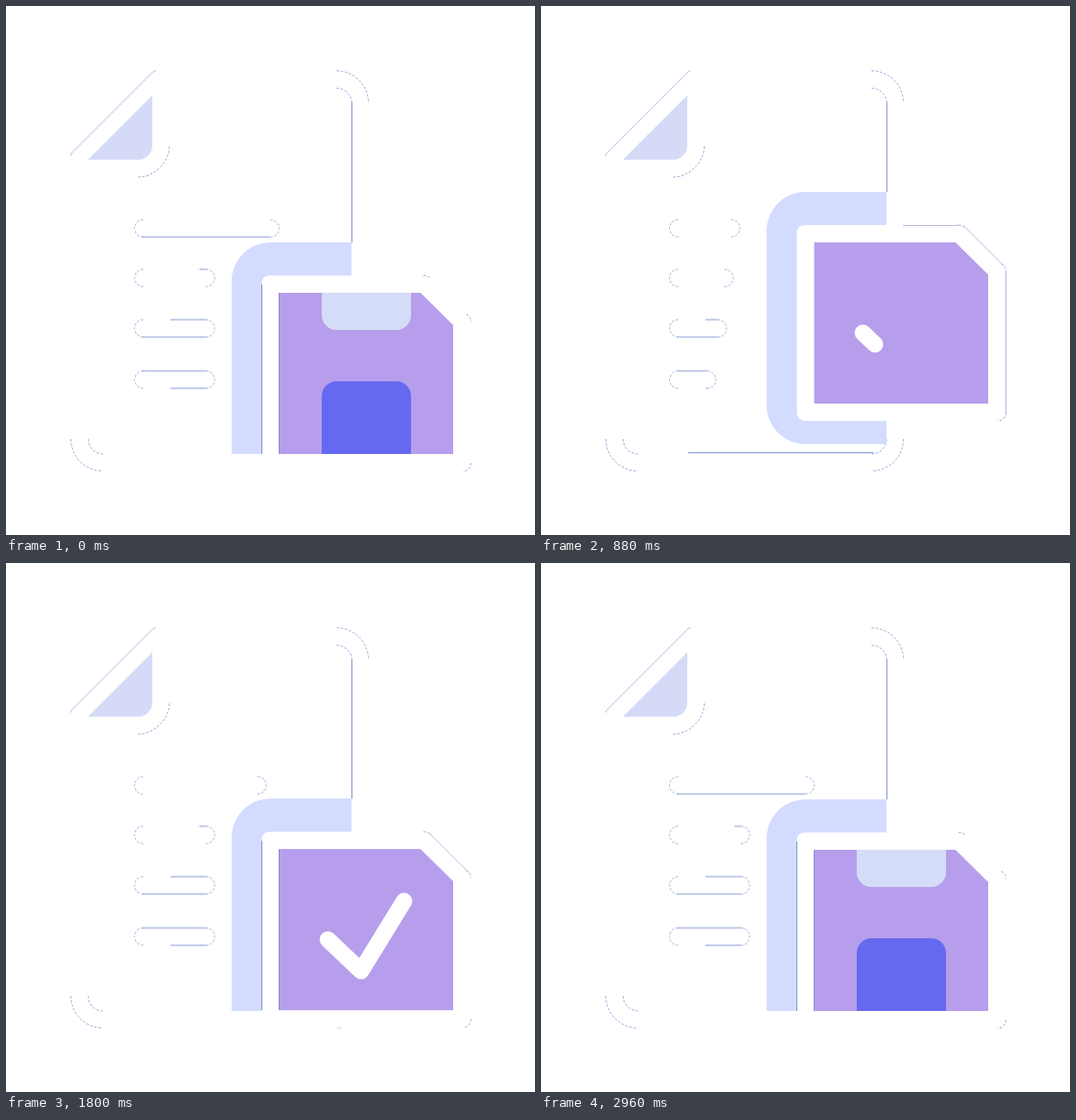
Animation of 640 by 640 pixels, one loop 3 s. Source, as an HTML page:

```html
<!DOCTYPE html>
<html lang="en">
<head>
<meta charset="utf-8">
<title>Saving a document</title>
<style>
  html, body { margin: 0; width: 100%; height: 100%; overflow: hidden; background: #fff; }
  svg { display: block; width: 100%; height: 100%; }

  .line { fill: none; stroke: #7189c8; stroke-width: 1; }
  .dots { fill: none; stroke: #8f9dd6; stroke-width: 1; stroke-dasharray: 3 2; }
  .soft { stroke: #a9b4dc; }
  .rim { stroke: #8f7bd0; }
  .paper { fill: #fff; }
  .fold { fill: #d5dbf7; }

  .disk, .page, .shutter, .tick, .shrink, .grow, .widen {
    animation: 3s cubic-bezier(.33, 0, .67, 1) infinite;
  }
  .disk { animation-name: lift; }
  .page { animation-name: slide; }
  .shutter { animation-name: shutter; }
  .tick { animation-name: tick; }
  .shrink { animation-name: shrink; }
  .grow { animation-name: grow; }
  .widen { animation-name: widen; }

  .high, .low, .moving, .base, .bevel, .early, .late, .covered {
    animation: 3s step-end infinite;
  }
  .high { animation-name: high; }
  .low { animation-name: low; }
  .moving { animation-name: moving; }
  .base { animation-name: base; }
  .bevel { animation-name: bevel; }
  .early { animation-name: early; }
  .late { animation-name: late; }
  .covered { animation-name: covered; }

  @keyframes lift {
    0%, 16.83% { transform: translateY(0); }
    29.33%, 44% { transform: translateY(-61px); }
    61.33%, 100% { transform: translateY(0); }
  }
  @keyframes slide {
    0%, 13.33% { transform: translateY(474px); }
    29.33%, 100% { transform: translateY(0); }
  }
  @keyframes shutter {
    0% { transform: translateX(0); }
    16% { transform: translateX(0); animation-timing-function: cubic-bezier(.33, 0, .67, .33); }
    28% { transform: translateX(200px); animation-timing-function: step-end; }
    28.1%, 80% { transform: translateX(-211px); }
    96%, 100% { transform: translateX(0); }
  }
  @keyframes tick {
    0% { stroke-dashoffset: 100; opacity: 0; animation-timing-function: step-end; }
    26.67% { stroke-dashoffset: 100; opacity: 1; }
    38.67%, 64% { stroke-dashoffset: 0; opacity: 1; }
    80.3% { stroke-dashoffset: -100; opacity: 1; animation-timing-function: step-end; }
    80.4%, 100% { stroke-dashoffset: -100; opacity: 0; }
  }
  @keyframes shrink {
    0%, 10.67% { transform: translateX(0); }
    23.33%, 100% { transform: translateX(var(--cut)); }
  }
  @keyframes grow {
    0%, 21.33% { transform: translateX(0); }
    29.33% { transform: translateX(var(--dip)); }
    36%, 100% { transform: translateX(0); }
  }
  @keyframes widen {
    0%, 21.33% { transform: translateX(-77px); }
    29.33% { transform: translateX(-90px); }
    36%, 44% { transform: translateX(-75px); }
    66.67%, 100% { transform: translateX(0); }
  }

  @keyframes high { 0% { opacity: 0; } 27% { opacity: 1; } 40%, 100% { opacity: 0; } }
  @keyframes low { 0% { opacity: 1; } 24% { opacity: 0; } 56%, 100% { opacity: 1; } }
  @keyframes moving { 0% { opacity: 1; } 29%, 100% { opacity: 0; } }
  @keyframes base { 0% { opacity: 0; } 18% { opacity: 1; } 27% { opacity: 0; } 40% { opacity: 1; } 50%, 100% { opacity: 0; } }
  @keyframes bevel { 0% { opacity: 0; } 27% { opacity: 1; } 40% { opacity: 0; } 55% { opacity: 1; } 62%, 100% { opacity: 0; } }
  @keyframes early { 0% { opacity: 1; } 10.67%, 100% { opacity: 0; } }
  @keyframes late { 0% { opacity: 0; } 66%, 100% { opacity: 1; } }
  @keyframes covered { 0% { opacity: 1; } 21%, 100% { opacity: 0; } }
</style>
</head>
<body>
<svg viewBox="0 0 640 640">
  <defs>
    <clipPath id="inside"><path d="M78 78H418V542H78Z"/></clipPath>
    <clipPath id="body"><path id="shell" d="M330.5 347H501.5L541 386V542H330.5Z"/></clipPath>
    <g id="corner">
      <path class="fold" d="M177 108V169a17 17 0 0 1-17 17H99Z"/>
      <path class="dots" d="M197.500 170Q197.500 184 186 195.500Q174.500 207 160 207"/>
    </g>
  </defs>

  <use href="#corner"/>
  <g id="oldBars"></g>

  <g clip-path="url(#inside)">
    <g class="page">
      <path class="paper" d="M78 180L180 78H439V563H78Z"/>
      <use href="#corner"/>
      <g class="moving">
        <path class="line" d="M197 98.500H400M99 186L177 108"/>
        <path class="dots" d="M174 81Q177 78.500 181 78.500"/>
      </g>
      <g id="newBars"></g>
    </g>
  </g>

  <path class="line" d="M418.500 117V290"/>
  <path class="line soft" d="M78.500 181Q78 179 80 177.500L175.500 82Q178 78.500 181 78.500"/>
  <path class="dots" d="M400 78.500A38.500 38.500 0 0 1 438.500 117M400 99.500A18.500 18.500 0 0 1 418.500 118
    M78.500 524A38.500 38.500 0 0 0 117 562.500M99.500 524A18 18 0 0 0 117 542
    M438.500 524A38.500 38.500 0 0 1 400 562.500M418 524A18 18 0 0 1 400 542"/>
  <path class="line high" d="M178 540.500H402"/>

  <g clip-path="url(#inside)">
    <rect class="disk" x="273" y="286" width="240" height="305" rx="47" fill="#d3dcff"/>
  </g>

  <g class="disk">
    <path class="paper" d="M418 286H420V340H418Z"/>
    <path class="paper" d="M309.500 336q0-10 10-10H505q5 0 8 3L559 374q3.500 3 3.500 8V553a10 10 0 0 1-10 10H319.500a10 10 0 0 1-10-10Z"/>
    <path class="line low" d="M309.500 337V542"/>
    <path class="dots" d="M505 326q5 0 8 3M557 373q5.500 3 5.500 9M562.500 553a10 10 0 0 1-10 10"/>
    <path class="line soft high" d="M438 326.500H505M562.500 382V553"/>
    <path class="line soft bevel" d="M512 327.500L560 375.500"/>
    <path class="line soft base" d="M434 563H553"/>

    <use href="#shell" fill="#b69eec"/>
    <g clip-path="url(#body)">
      <g class="shutter">
        <path fill="#d5dcf7" d="M382 340H490V374a18 18 0 0 1-18 18H400a18 18 0 0 1-18-18Z"/>
        <path fill="#6569ef" d="M382 550V472a18 18 0 0 1 18-18H472a18 18 0 0 1 18 18V550Z"/>
      </g>
    </g>
    <path class="line rim low" d="M330.500 347V542"/>
    <path class="line rim base" d="M331 541.500H541"/>
    <path class="tick" d="M389.500 456.500L429.500 494.500L481.500 410" pathLength="100" fill="none" stroke="#fff"
      stroke-width="20" stroke-linecap="round" stroke-linejoin="round" stroke-dasharray="100 300"/>
  </g>
</svg>
<script>
  // Text rows: top, right end, straight edges, shortest offset, dip offset
  const rows = [
    [258.5, 330.5, 'M165 21H320', -155, 0],
    [318.5, 252.5, 'M234 0h9', -77, -20],
    [379.5, 252.5, 'M199 0h44M165 21h78', -77, -28],
    [441.5, 252.5, 'M165 0h78M199 21h44', -77, -41]
  ];

  const bar = ([y, right, edges, cut, dip], edgeClass, endClass) => `
    <g transform="translate(0 ${y})">
      <path class="line ${edgeClass}" d="${edges}"/>
      <path class="dots" d="M166 0a10.500 10.500 0 0 0 0 21"/>
      <g transform="translate(${right} 0)">
        <g class="${endClass}" style="--cut:${cut}px;--dip:${dip}px">
          <path class="paper" d="M-10.500-2H160V23H-10.500Z"/>
          <path class="dots" d="M-10.500 0a10.500 10.500 0 0 1 0 21"/>
        </g>
      </g>
    </g>`;

  const fill = (id, draw) => document.getElementById(id).innerHTML = rows.map(draw).join('');
  fill('oldBars', (row, i) => i ? `<g class="covered">${bar(row, '', 'shrink')}</g>` : bar(row, 'early', 'shrink'));
  fill('newBars', (row, i) => i ? bar(row, '', 'grow') : bar(row, 'late', 'widen'));
</script>
</body>
</html>
```
